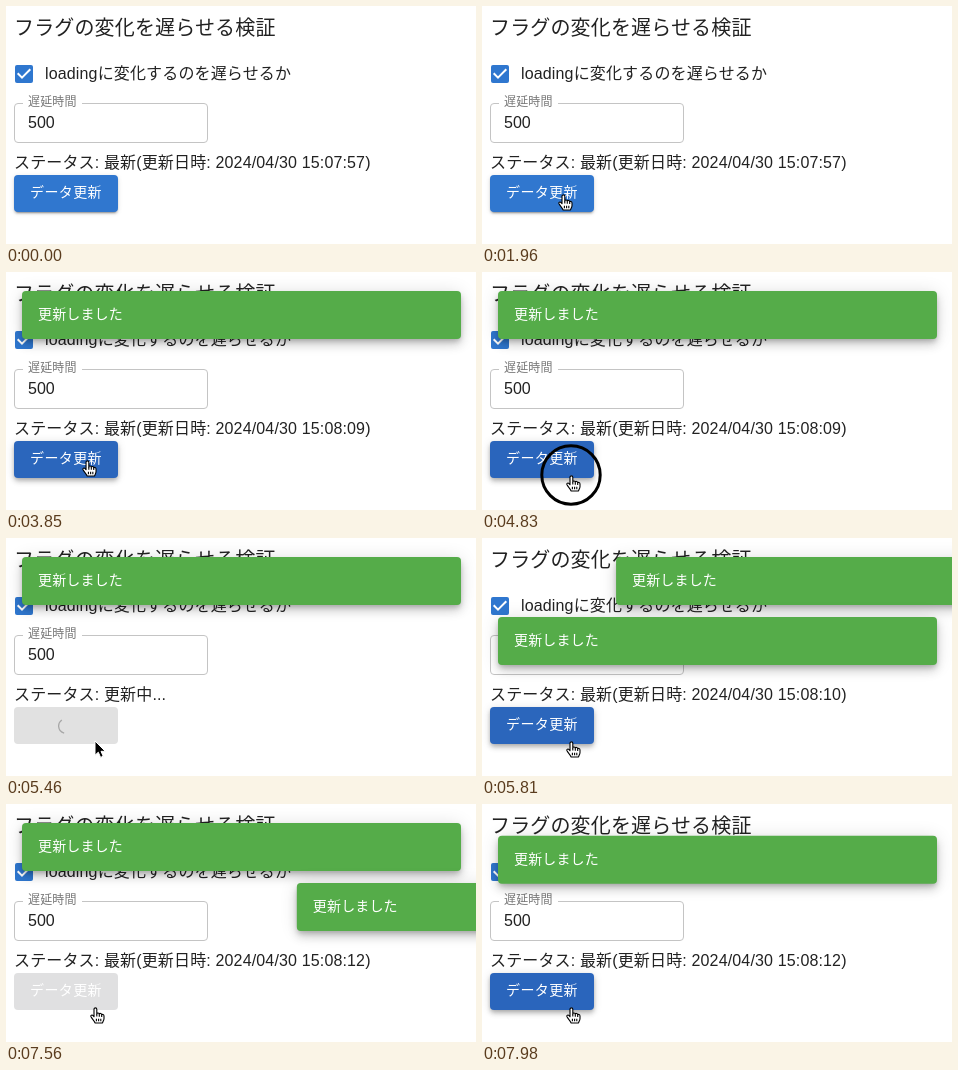
An HTML page that plays this animation: 470x238 px, repeating every 8000 ms.

```html
<!DOCTYPE html>
<html lang="ja">
<head>
<meta charset="utf-8">
<title>フラグの変化を遅らせる検証</title>
<style>
  html, body { margin: 0; width: 100%; height: 100%; overflow: hidden; background: #fff; }
  body {
    position: relative;
    font: 350 16px/24px "Liberation Sans", "Noto Sans CJK JP", "Noto Sans CJK", sans-serif;
    letter-spacing: .15px;
    color: #222;
  }
  body > * { position: absolute; white-space: nowrap; }
  #title { left: 8px; top: 10px; font-size: 20px; }
  #check { left: 9px; top: 59px; }
  #option { left: 39px; top: 56px; }
  #field {
    left: 8px; top: 97px; width: 194px; height: 40px; box-sizing: border-box;
    border: 1px solid #c4c4c4; border-radius: 4px;
  }
  #caption {
    left: 17px; top: 87px; width: 54px; height: 18px; padding-left: 5px;
    font-size: 12px; line-height: 19px; color: #777; background: #fff;
  }
  #value { left: 22px; top: 105px; letter-spacing: 0; }
  #status { left: 8px; top: 145px; }
  #button {
    left: 8px; top: 169px; width: 104px; height: 37px; overflow: hidden; border-radius: 4px;
    font-size: 14px; line-height: 35px; letter-spacing: .4px; text-align: center; color: #fff;
  }
  #ripple { position: absolute; width: 156px; height: 156px; margin: -78px; border-radius: 50%; background: #fff; }
  #label { position: relative; }
  #spinner { position: absolute; left: 44px; top: 10.5px; }
  .snack {
    left: 16px; top: 19px; width: 439px; height: 48px; box-sizing: border-box; padding-left: 16px;
    border-radius: 4px; background: #55ac49; color: #fff;
    font-size: 14px; line-height: 46px;
    box-shadow: 0 3px 5px -1px #0003, 0 6px 10px #00000024, 0 1px 18px #0000001f;
  }
  #pointer { left: 0; top: 0; }
</style>
</head>
<body>
  <div id="title">フラグの変化を遅らせる検証</div>
  <svg id="check" width="18" height="18">
    <rect width="18" height="18" rx="2" fill="#2f77cf"/>
    <path d="M2.7 8.3 7 12.6 15.3 4.3" fill="none" stroke="#fff" stroke-width="2"/>
  </svg>
  <div id="option">loadingに変化するのを遅らせるか</div>
  <div id="field"></div>
  <div id="caption">遅延時間</div>
  <div id="value">500</div>
  <div id="status"></div>
  <div id="button">
    <div id="ripple"></div>
    <div id="label">データ更新</div>
    <svg id="spinner" width="16" height="16" viewBox="-22 -22 44 44">
      <circle id="arc" r="20.2" fill="none" stroke="#000" stroke-opacity=".26" stroke-width="3.6"/>
    </svg>
  </div>
  <div class="snack">更新しました</div>
  <div class="snack">更新しました</div>
  <div class="snack">更新しました</div>
  <svg id="pointer" width="470" height="238">
    <circle id="ring" fill="none" stroke="#000" stroke-width="3"/>
    <g id="cursor" stroke-linejoin="round">
      <path id="arrow" d="M0 0V14.2L3.3 11.2 5.6 16.4 8.2 15.2 6 10.3H10.3Z" fill="#000" stroke="#fff"/>
      <g id="hand" transform="translate(1 1)" stroke="#000" stroke-width="1.1">
        <path fill="#fff" d="M-2 1.2C-2-.6.8-.6.8 1.2V6C1 4.6 3.2 4.7 3.3 6.2 3.6 5 5.6 5.2 5.7 6.8 6.2 6 8 6.3 8 8V10.5C8 12.5 6.8 13.5 6.5 15H-1C-1.2 13.3-3.5 11.5-5 8.8-5.8 7.2-3.9 6.4-2.9 7.6L-2 8.7Z"/>
        <path fill="none" d="M.8 6V8.6M3.3 6.2V8.8M5.7 6.8V9M.4 10.8V13.2M2.6 10.8V13.2M4.8 10.8V13.2"/>
      </g>
    </g>
  </svg>
<script>
const LOOP = 8000;
const $ = id => document.getElementById(id);
const snackEls = document.querySelectorAll('.snack');

// One entry per click; load and done bound the busy state.
const clicks = [
  { at: 2870, load: 3170, done: 3630, clock: '15:08:09' },
  { at: 4830, load: 5130, done: 5590, clock: '15:08:10' },
  { at: 6790, load: 7090, done: 7550, clock: '15:08:12' },
];
const snacks = [
  { enter: 3609, row: 0, leave: 5743 },
  { enter: 5569, row: 60, rise: 6040, leave: 7690 },
  { enter: 7529, row: 60, rise: 7892, leave: Infinity },
];
const path = [
  [630, 204, 214], [800, 172, 200], [980, 112, 180], [1120, 86, 175],
  [1260, 81, 188], [3850, 81, 188], [4130, 89, 203],
];

const lerp = (a, b, k) => a + (b - a) * k;
const mix = (a, b, k) => a.map((v, i) => lerp(v, b[i], k));
const show = (el, on) => { el.style.visibility = on ? 'visible' : 'hidden'; };

function bezier(x1, y1, x2, y2) {
  const axis = (a, b, s) => 3 * (1 - s) ** 2 * s * a + 3 * (1 - s) * s * s * b + s ** 3;
  return x => {
    if (x <= 0) return 0;
    if (x >= 1) return 1;
    let lo = 0, hi = 1;
    for (let i = 0; i < 24; i++) {
      const mid = (lo + hi) / 2;
      if (axis(x1, x2, mid) < x) lo = mid; else hi = mid;
    }
    return axis(y1, y2, lo);
  };
}
const standard = bezier(.4, 0, .2, 1);
const decelerate = bezier(0, 0, .2, 1);
const sharp = bezier(.4, 0, .6, 1);
const easeInOut = bezier(.42, 0, .58, 1);
const tween = (t, start, length, curve = standard) => curve((t - start) / length);

function pointerAt(t) {
  const next = path.findIndex(p => p[0] > t);
  if (next < 0) return path.at(-1).slice(1);
  if (next === 0) return path[0].slice(1);
  const a = path[next - 1], b = path[next];
  return mix(a, b, (t - a[0]) / (b[0] - a[0])).slice(1);
}

function drawButton(t, click, busy) {
  const hover = tween(t, 1950, 250);
  const disabled = click ? tween(t, click.load, 250) - tween(t, click.done, 250) : 0;
  const blue = mix([48, 119, 207], [42, 101, 188], hover);
  const [r, g, b] = mix(blue, [225, 225, 225], disabled);
  // y, blur and spread of each shadow layer
  const s = mix([3, 1, -2, 2, 2, 0, 1, 5, 0], [2, 4, -1, 4, 5, 0, 1, 10, 0], hover);
  const layers = [.2, .14, .12].map((alpha, i) =>
    `0 ${s[3 * i]}px ${s[3 * i + 1]}px ${s[3 * i + 2]}px rgba(0,0,0,${alpha * (1 - disabled)})`);
  $('button').style.background = `rgb(${r},${g},${b})`;
  $('button').style.boxShadow = layers.join();
  show($('label'), !busy);
  show($('spinner'), busy);
  show($('ripple'), click && t < click.load);
  if (!click) return;

  const [x, y] = pointerAt(click.at);
  const ripple = $('ripple').style;
  ripple.left = x - 8 + 'px';
  ripple.top = y - 169 + 'px';
  ripple.transform = `scale(${tween(t, click.at, 550)})`;
  ripple.opacity = .3 * (1 - tween(t, click.at + 140, 550));

  const dash = tween(t, click.load, 700, easeInOut);
  $('arc').setAttribute('stroke-dasharray', `${lerp(1, 100, dash)} 200`);
  $('arc').setAttribute('stroke-dashoffset', -15 * dash);
  $('arc').setAttribute('transform', `rotate(${(t - click.load) / 1400 * 360})`);
}

function drawSnacks(t) {
  snacks.forEach(({ enter, row, rise, leave }, i) => {
    const x = 454 * (1 - tween(t, enter, 225, decelerate) + tween(t, leave, 195, sharp));
    const y = row * (1 - (rise ? tween(t, rise, 175) : 0));
    snackEls[i].style.transform = `translate(${x}px,${y}px)`;
    show(snackEls[i], t >= enter && t < leave + 195);
  });
}

function drawPointer(t, click, busy) {
  const [x, y] = pointerAt(t);
  const hand = t >= 1950 && !busy;
  $('cursor').setAttribute('transform', `translate(${x} ${y})`);
  show($('arrow'), t >= 630 && !hand);
  show($('hand'), hand);

  const firstPress = t >= 1400 && t < 1540;
  show($('ring'), firstPress || (click && t < click.at + 140));
  $('ring').setAttribute('cx', x);
  $('ring').setAttribute('cy', y);
  $('ring').setAttribute('r', firstPress ? 21.5 : 29.2);
}

function draw(t) {
  const click = clicks.findLast(c => t >= c.at);
  const busy = Boolean(click) && t >= click.load && t < click.done;
  const finished = clicks.findLast(c => t >= c.done);
  const clock = finished ? finished.clock : '15:07:57';
  const status = busy ? '更新中...' : `最新(更新日時: 2024/04/30 ${clock})`;
  $('status').textContent = `ステータス: ${status}`;
  drawButton(t, click, busy);
  drawSnacks(t);
  drawPointer(t, click, busy);
}

const start = performance.now();
function tick() {
  draw((performance.now() - start) % LOOP);
  requestAnimationFrame(tick);
}
tick();
</script>
</body>
</html>
```
